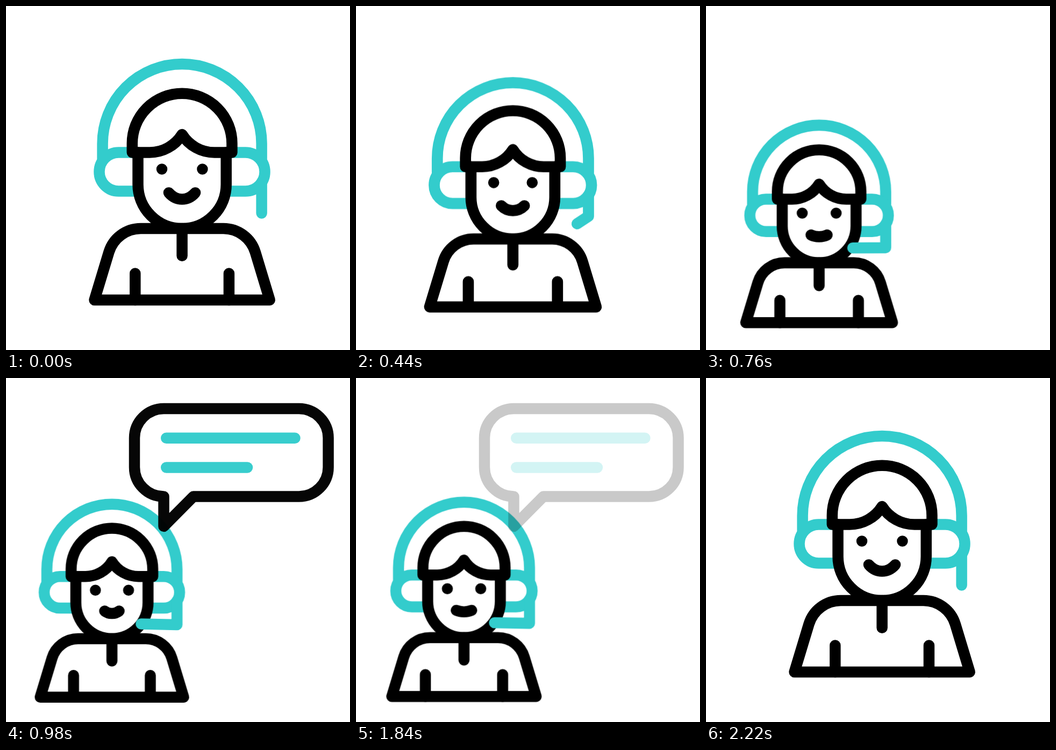
An HTML page that plays this animation: 640x640 px, repeating every 2.4 s.

```html
<!DOCTYPE html>
<html lang="en">
<head>
<meta charset="utf-8">
<title>Support agent</title>
<style>
  html, body { margin: 0; width: 100%; height: 100%; overflow: hidden; background: #fff; }
  svg { display: block; width: 100%; height: 100%; }
  path { fill: none; }
  g { stroke-linecap: round; stroke-linejoin: round; }
  .ink { stroke: #000; }
  .teal { stroke: #3cc; }

  .agent, .boom, .mouth, .bubble, .line {
    animation: 2400ms cubic-bezier(.3333, 0, .6667, 1) infinite;
  }
  .agent { transform-box: view-box; transform-origin: 0 0; animation-name: move; }
  .boom { animation-name: swing; }
  .mouth { animation-name: talk; }
  .bubble { stroke-width: 20.5px; animation-name: fade; }
  .first { animation-name: shrink; }
  .second { animation-name: grow; }

  /* The stroke widens as the figure shrinks, so lines keep their weight. */
  @keyframes move {
    0%, 8.3333%, 91.6667%, 100% { transform: translate(0px, 0px) scale(1); stroke-width: 20.5px; }
    37.5%, 75% { transform: translate(-70.9px, 146.35px) scale(.818); stroke-width: 25.06px; }
  }
  @keyframes swing {
    0%, 8.3333%, 91.6667%, 100% { d: path("M475.6 328 L475.6 364.5 L475.6 385.6"); }
    37.5%, 75% { d: path("M475.6 328 L475.6 382.3 L394 380.4"); }
  }
  @keyframes talk {
    0%, 8.3333%, 91.6667%, 100% { d: path("M302.9 347.4 C316.5 363.5 338.5 363.5 352.1 347.4"); }
    37.5%, 50%, 62.5%, 75% { d: path("M310.3 352.6 C319.8 356.6 335.2 356.6 344.7 352.6"); }
    43.75%, 56.25%, 68.75% { d: path("M311.6 350 C320.3 360 334.7 360 343.4 350"); }
  }
  @keyframes fade {
    0%, 33.3333%, 79.1667%, 100% { opacity: 0; }
    41.6667%, 70.8333% { opacity: 1; }
  }
  @keyframes shrink {
    0%, 41.6667%, 75%, 100% { d: path("M298.2 111.7 L537.5 111.7"); }
    58.3333% { d: path("M298.2 111.7 L368.5 111.7"); }
  }
  @keyframes grow {
    0%, 41.6667%, 75%, 100% { d: path("M298.2 166.4 L449 166.4"); }
    58.3333% { d: path("M298.2 166.4 L533.3 166.4"); }
  }
</style>
</head>
<body>
<svg viewBox="0 0 640 640">
  <g class="agent">
    <g class="teal">
      <path d="M179.6 284 V256 A148 148 0 0 1 475.6 256 V284"/>
      <path d="M242 272.5 H209.5 A36 36 0 0 0 209.5 344.5 H242"/>
      <path d="M413 272.5 H445.5 A36 36 0 0 1 445.5 344.5 H413"/>
    </g>
    <g class="ink">
      <!-- hair and face -->
      <path d="M234.8 272.5 V255.5 A92.8 92.8 0 0 1 420.4 255.5 V272.5 H388 A71 71 0 0 1 327.6 239 A71 71 0 0 1 267 272.5 Z"/>
      <path d="M245.5 272.5 V332 A82.1 82.1 0 0 0 409.7 332 V272.5"/>
      <path d="M290 303.6 h.01 M365.4 303.6 h.01"/>
      <path class="mouth" d="M302.9 347.4 C316.5 363.5 338.5 363.5 352.1 347.4"/>
      <!-- torso -->
      <path d="M164.5 547 L191.4 458 A62 62 0 0 1 250.7 414 H404.5 A62 62 0 0 1 463.8 458 L490.7 547 Z"/>
      <path d="M327.6 414 V464.8 M240.3 497.6 V547 M414.9 497.6 V547"/>
    </g>
    <g class="teal">
      <path class="boom" d="M475.6 328 L475.6 364.5 L475.6 385.6"/>
    </g>
  </g>
  <g class="bubble">
    <path class="ink" d="M293.5 220.6 A54.5 54.5 0 0 1 239 166 V111.5 A54.6 54.6 0 0 1 293.6 56.9 H545 A54.6 54.6 0 0 1 599.6 111.5 V166 A54.6 54.6 0 0 1 545 220.6 H348.5 L293.5 276 Z"/>
    <path class="line first teal" d="M298.2 111.7 L537.5 111.7"/>
    <path class="line second teal" d="M298.2 166.4 L449 166.4"/>
  </g>
</svg>
</body>
</html>
```
